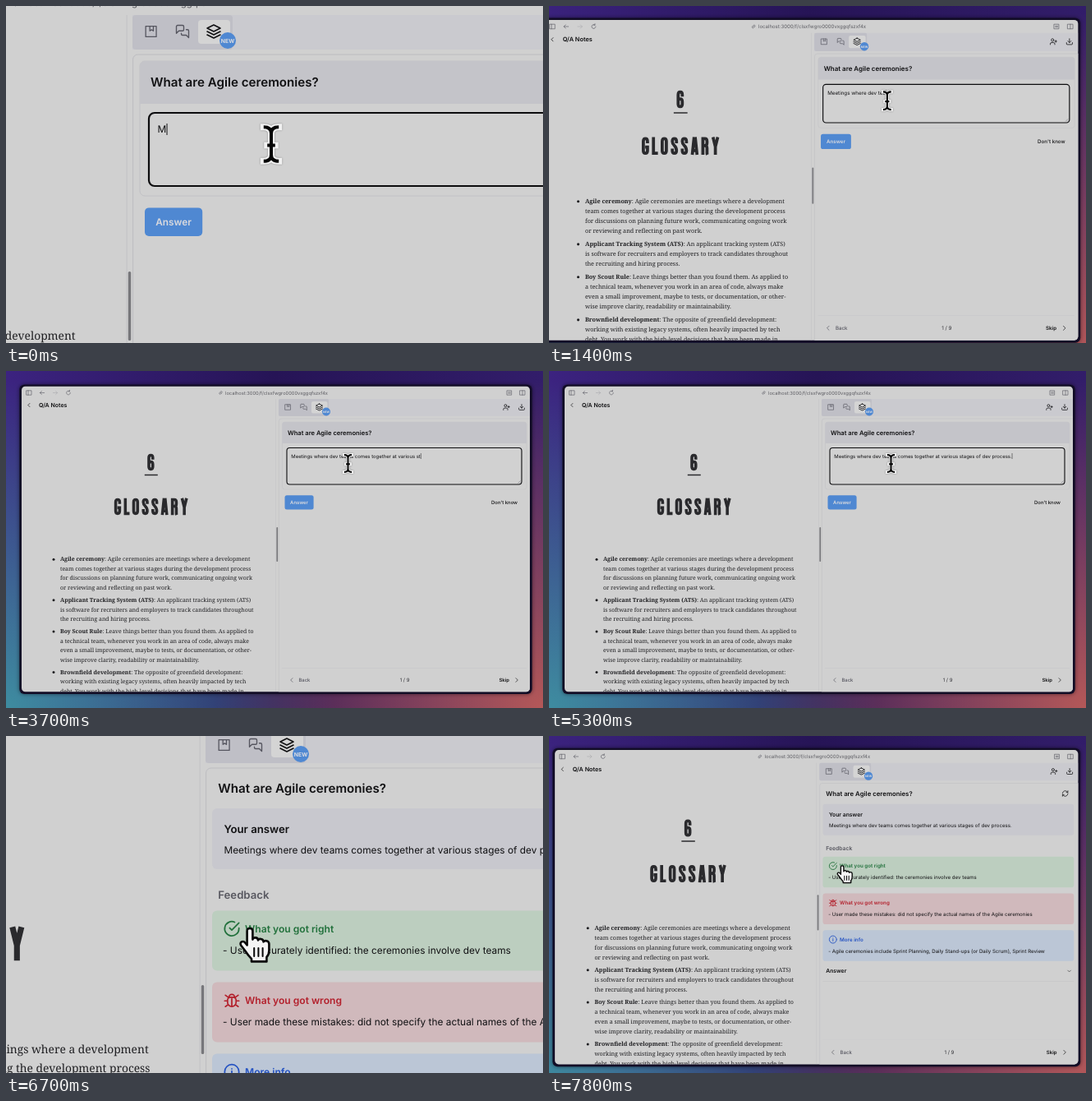
An HTML page with a canvas for the animation above (7.9 s loop, 654 by 410 pixels).

```html
<!DOCTYPE html>
<html lang="en">
<head>
<meta charset="utf-8">
<title>Flashcard review</title>
<style>
html, body { margin: 0; width: 100%; height: 100%; overflow: hidden; background: #150d3a; }
canvas { display: block; }
</style>
</head>
<body>
<canvas id="stage" width="654" height="410"></canvas>
<script>
const W = 654, H = 410, LOOP = 7900;
const screen2d = document.getElementById('stage').getContext('2d');
const layer = document.createElement('canvas');
layer.width = W;
layer.height = H;
const ctx = layer.getContext('2d');

const ZOOM_OUT = 911, ZOOM_IN = 5467, ZOOM_OUT_AGAIN = 7247;
const SUBMIT = 5900, FEEDBACK = 6500;
const INK = '#111113', GREY = '#55555f', PAGE = '#d0d0d0', BOOK_INK = '#1f1f22';
const SANS = 'Inter, sans-serif', SERIF = '"Noto Serif", serif';

const ANSWER = 'Meetings where dev teams comes together at various stages of dev process.';
// [time, characters typed]
const TYPING = [[0, 1], [100, 2], [200, 3], [390, 3], [1400, 22], [2000, 29], [3000, 44], [3190, 44],
  [3200, 45], [3900, 57], [4700, 65], [5100, 72], [5290, 72], [5300, 73]];

const GLOSSARY = [
  ['Agile ceremony', [': Agile ceremonies are meetings where a development',
    'team comes together at various stages during the development process',
    'for discussions on planning future work, communicating ongoing work',
    'or reviewing and reflecting on past work.']],
  ['Applicant Tracking System (ATS)', [': An applicant tracking system (ATS)',
    'is software for recruiters and employers to track candidates throughout',
    'the recruiting and hiring process.']],
  ['Boy Scout Rule', [': Leave things better than you found them. As applied to',
    'a technical team, whenever you work in an area of code, always make',
    'even a small improvement, maybe to tests, or documentation, or other-',
    'wise improve clarity, readability or maintainability.']],
  ['Brownfield development', [': The opposite of greenfield development:',
    'working with existing legacy systems, often heavily impacted by tech',
    'debt. You work with the high-level decisions that have been made in',
    'the past.']]
];

const CARDS = [
  ['check', '#bccebf', '#22713c', 'What you got right',
    '- User accurately identified: the ceremonies involve dev teams'],
  ['bug', '#d0b9bc', '#b3202c', 'What you got wrong',
    '- User made these mistakes: did not specify the actual names of the Agile ceremonies'],
  ['info', '#bbc6d6', '#2452c2', 'More info',
    '- Agile ceremonies include Sprint Planning, Daily Stand-ups (or Daily Scrum), Sprint Review']
];

// Icons on a 24-unit grid
const ICONS = {
  layers: 'M12 2 2 7l10 5 10-5-10-5zM2 17l10 5 10-5M2 12l10 5 10-5',
  book: 'M3 3H21V21H3ZM10 3V11L13 9L16 11V3',
  chat: 'M14 9a2 2 0 0 1-2 2H6l-4 4V4a2 2 0 0 1 2-2h8a2 2 0 0 1 2 2zM18 9h2a2 2 0 0 1 2 2v11l-4-4h-6a2 2 0 0 1-2-2v-1',
  invite: 'M16 21v-2a4 4 0 0 0-4-4H6a4 4 0 0 0-4 4v2M13 7a4 4 0 1 1-8 0 4 4 0 0 1 8 0M19 8v6M16 11h6',
  download: 'M21 15v4a2 2 0 0 1-2 2H5a2 2 0 0 1-2-2v-4M7 10l5 5 5-5M12 15V3',
  refresh: 'M3 12a9 9 0 0 1 15-6.7L21 8M21 3v5h-5M21 12a9 9 0 0 1-15 6.7L3 16M3 21v-5h5',
  check: 'M22 11v1a10 10 0 1 1-6-9.1M22 4 12 14l-3-3',
  bug: 'M8 8a4 4 0 0 1 8 0ZM6 12a4 4 0 0 1 4-4h4a4 4 0 0 1 4 4v3a6 6 0 0 1-12 0zM12 20V10M6 13H2M22 13h-4M7 8 3 5M17 8l4-3M7 18l-4 3M17 18l4 3',
  info: 'M22 12a10 10 0 1 1-20 0 10 10 0 0 1 20 0M12 16v-5M12 8v.1',
  left: 'M15 5l-7 7 7 7', right: 'M9 5l7 7-7 7', down: 'M5 9l7 7 7-7',
  back: 'M21 12H3M10 5l-7 7 7 7', forward: 'M3 12H21M14 5l7 7-7 7',
  reload: 'M20 12a8 8 0 1 1-3-6.2M17 1v5h-5',
  sidebar: 'M3 4H21V20H3ZM9 4V20', split: 'M3 4H21V20H3ZM12 4V20', reader: 'M4 4H20V20H4ZM8 10h8M8 14h8',
  link: 'M10 14L14 10M9 9L6 12a4 4 0 0 0 6 6l3-3M15 15l3-3a4 4 0 0 0-6-6l-3 3'
};

// Condensed display letters as centre lines: [advance, path]
const LETTERS = {
  G: [13.2, 'M5.4 6V3.5Q5.4 0 2.7 0T0 3.5V15.5Q0 19 2.7 19T5.4 15.5V11H2.4'],
  L: [11.4, 'M0-2V19H5.8'],
  O: [13.2, 'M0 3.5Q0 0 2.7 0T5.4 3.5V15.5Q5.4 19 2.7 19T0 15.5Z'],
  S: [13, 'M5.4 6V3.5Q5.4 0 2.7 0T0 3.5Q0 6.5 2.7 9T5.4 15.5Q5.4 19 2.7 19T0 15.5V13'],
  A: [13.8, 'M0 21 2.4-2M6.2 21 3.8-2M1 15.4H5.2'],
  R: [13.2, 'M0 21V0H2.7Q5.4 0 5.4 3.5V5.5Q5.4 9 2.7 9H0M2.7 9Q5.4 9 5.4 12.5V18Q5.4 20 5.8 21'],
  Y: [13.8, 'M0-2 3.1 10.5 6.2-2M3.1 10V21'],
  6: [13.2, 'M5.4 6V3.5Q5.4 0 2.7 0T0 3.5V15.5Q0 19 2.7 19T5.4 15.5V12.5Q5.4 9 2.7 9T0 12']
};

const IBEAM = new Path2D('M-4.6-10.4Q0-10.4 0-6.5V6.5Q0 10.4-4.6 10.4M4.6-10.4Q0-10.4 0-6.5M0 6.5Q0 10.4 4.6 10.4M-2.4.8H2.4');
const HAND = new Path2D('M-1.7 1.6Q-1.7 0 0 0T1.7 1.6V6.8Q1.9 5.6 3.4 5.7Q5 5.8 5 7.2Q5.3 6.3 6.7 6.5Q8.3 6.8 8.3 8.2Q8.8 7.4 10 7.6Q11.7 7.9 11.7 9.5V13.5Q11.7 16 10.2 17.5V20.2H1V18.6Q-1 16.5-3 13.5L-5.3 10.5Q-6.3 9-5 8.2Q-3.8 7.6-2.7 9L-1.7 10.2Z');
const HAND_FOLDS = new Path2D('M2.6 12V17M5.2 12V17M7.8 12V17');

const clamp = v => Math.max(0, Math.min(1, v));
const smooth = v => v * v * (3 - 2 * v);
// Critically damped spring, from 1 down to 0
const settle = ms => ms < 0 ? 1 : (1 + ms * .0097) * Math.exp(-ms * .0097);

function typedCount(t) {
  const next = TYPING.findIndex(key => key[0] > t);
  if (next < 0) return ANSWER.length;
  const [t0, n0] = TYPING[next - 1], [t1, n1] = TYPING[next];
  return Math.floor(n0 + (n1 - n0) * (t - t0) / (t1 - t0));
}

function camera(t) {
  const first = t < ZOOM_IN;
  const zoom = first ? settle(t - ZOOM_OUT) : (1 - settle(t - ZOOM_IN)) * settle(t - ZOOM_OUT_AGAIN);
  const [x, y] = first ? [510, 57] : [421, 77];
  return { scale: 1 + zoom, x: -x * zoom, y: -y * zoom };
}

// y is the middle of the capitals
function text(str, x, y, size = 5.94, weight = 400, color = INK, align = 'left', family = SANS) {
  ctx.font = `${weight} ${size}px ${family}`;
  ctx.fillStyle = color;
  ctx.textAlign = align;
  ctx.fillText(str, x, y + size * .36);
  return ctx.measureText(str).width;
}

function box(x0, y0, x1, y1, fill, radius = 0, stroke, width = .5) {
  ctx.beginPath();
  ctx.roundRect(x0, y0, x1 - x0, y1 - y0, radius);
  if (fill) { ctx.fillStyle = fill; ctx.fill(); }
  if (stroke) { ctx.strokeStyle = stroke; ctx.lineWidth = width; ctx.stroke(); }
}

function disc(x, y, r, fill) {
  ctx.beginPath();
  ctx.arc(x, y, r, 0, 7);
  ctx.fillStyle = fill;
  ctx.fill();
}

function icon(name, x, y, size, color = INK, weight = 2) {
  ctx.save();
  ctx.translate(x - size / 2, y - size / 2);
  ctx.scale(size / 24, size / 24);
  ctx.strokeStyle = color;
  ctx.lineWidth = weight;
  ctx.lineCap = ctx.lineJoin = 'round';
  ctx.stroke(new Path2D(ICONS[name]));
  ctx.restore();
}

function heading(word, x, y) {
  ctx.save();
  ctx.translate(x, y);
  ctx.scale(.89, .89);
  ctx.translate(2, 2);
  ctx.strokeStyle = '#2a2a2d';
  ctx.lineWidth = 4;
  for (const letter of word) {
    const [advance, path] = LETTERS[letter];
    ctx.stroke(new Path2D(path));
    ctx.translate(advance, 0);
  }
  ctx.restore();
}

function wallpaper() {
  const top = ctx.createLinearGradient(0, 0, W, 0);
  top.addColorStop(0, '#3c2380');
  top.addColorStop(.5, '#261456');
  top.addColorStop(1, '#321d6a');
  ctx.fillStyle = top;
  ctx.fillRect(0, 0, W, H);
  for (const [x, color] of [[0, '62,140,160'], [W, '180,88,88']]) {
    const glow = ctx.createRadialGradient(x, H, 0, x, H, 400);
    glow.addColorStop(0, `rgba(${color},1)`);
    glow.addColorStop(1, `rgba(${color},0)`);
    ctx.fillStyle = glow;
    ctx.fillRect(0, 0, W, H);
  }
}

function browserBar() {
  icon('sidebar', 28, 26.5, 8, GREY, 1.8);
  icon('back', 44, 26.5, 7, GREY);
  icon('forward', 60, 26.5, 7, '#aaaaae');
  icon('reload', 76, 26.5, 7, GREY);
  icon('link', 261.5, 26.5, 6, GREY);
  text('localhost:3000/f/clsxfwgro0000vxggqfszxf4x', 267, 26.5, 5.75, 400, '#5c5c62');
  icon('reader', 613, 26.5, 8, GREY, 1.8);
  icon('split', 629, 26.5, 8, GREY, 1.8);
}

function bookPage() {
  icon('left', 28, 41.5, 7, INK, 2.4);
  text('Q/A Notes', 40, 41.5, 7, 600);
  heading('6', 172.2, 100.7);
  box(168.8, 125.8, 184.8, 127.3, '#2a2a2d');
  heading('GLOSSARY', 131.8, 154.7);
  const bookText = (str, x, y, weight) => text(str, x, y, 6.9, weight, BOOK_INK, 'left', SERIF);
  let y = 229;
  for (const [term, lines] of GLOSSARY) {
    disc(58, y + .2, 1.5, BOOK_INK);
    lines.forEach((line, i) => {
      const termWidth = i ? 0 : bookText(term, 66, y, 600);
      bookText(line, 66 + termWidth, y, 400);
      y += 11.5;
    });
    y += 3.6;
  }
}

function panelFrame() {
  box(328.3, 34, 328.8, 390, '#c2c2c5');
  box(329.4, 190, 331.1, 232, '#77777b', .8);
  box(332, 34, 638, 55, '#cacacf');
  box(332, 34, 393, 55, '#bfbfc6', 2);
  box(372, 37, 391.5, 51.5, '#d4d4d4', 2);
  icon('book', 343.3, 44, 8.6, GREY, 1.8);
  icon('chat', 362.5, 44, 9, GREY, 1.8);
  icon('layers', 381.5, 44, 9.6, INK);
  disc(390, 49.5, 5, '#4f88d2');
  text('NEW', 390, 49.6, 3.4, 700, '#dcdce0', 'center');
  icon('invite', 609.5, 44, 9);
  icon('download', 628, 44, 9);
  box(332.3, 58, 642, 400, PAGE, 3, '#bcbcc0');
  box(336, 361, 634, 361.4, '#c6c6c9');
  icon('left', 348, 376, 8, GREY);
  text('Back', 356.5, 376, 5.9, 500, GREY);
  text('1 / 9', 485.5, 376, 6, 400, '#333338', 'center');
  text('Skip', 600.5, 376, 5.9, 600);
  icon('right', 622, 376, 8);
}

function questionView(t) {
  box(336.5, 62, 634, 144, PAGE, 3, '#c1c1c5');
  box(336.5, 62, 634, 88, '#c4c4c9', [3, 3, 0, 0]);
  text('What are Agile ceremonies?', 343, 75, 7.58, 600);
  box(342, 93.5, 628, 138, '#d1d1d1', 3.5, '#0c0c0e', 1.1);
  const caret = 347.3 + text(ANSWER.slice(0, typedCount(t)), 347.3, 103.5);
  box(caret + .1, 100, caret + .6, 107, INK);
  ctx.beginPath();
  ctx.moveTo(623.5, 136.5);
  ctx.lineTo(626.5, 133.5);
  ctx.moveTo(625.5, 136.5);
  ctx.lineTo(626.5, 135.5);
  ctx.strokeStyle = GREY;
  ctx.lineWidth = .4;
  ctx.stroke();
  box(339.5, 151.2, 374.6, 168.5, '#4f88d2', 2.5);
  text('Answer', 357, 160, 5.9, 600, '#dadade', 'center');
  text("Don't know", 623, 160, 5.9, 500, INK, 'right');
}

function resultView(t) {
  text('What are Agile ceremonies?', 339.6, 70.2, 7.58, 600);
  icon('refresh', 622.7, 70.2, 8.5);
  box(336, 82.5, 633, 119.5, '#c8c8ce', 3);
  text('Your answer', 343.2, 95.2, 6.6, 600);
  text(ANSWER, 343.2, 107.9);
  text('Feedback', 339.6, 134.9, 6.6, 600, '#585860');
  const ready = t >= FEEDBACK;
  if (ready) CARDS.forEach(([name, fill, color, title, body], i) => {
    const y = 144.7 + i * 43.5;
    box(336, y, 633, y + 36.5, fill, 3);
    icon(name, 348, y + 11, 10.4, color);
    text(title, 356, y + 11, 6.05, 600, color);
    text(body, 342.5, y + 24.4);
  });
  const y = ready ? 279.9 : 155.7;
  text('Answer', 339.6, y, 6.6, 600);
  icon('down', 627.5, y, 6);
  box(336, y + 12.3, 633, y + 12.7, '#c2c2c5');
}

function pointer(t) {
  const move = smooth(clamp((t - ZOOM_IN) / 400));
  ctx.save();
  ctx.translate(416.5 - 57.5 * move, 112.5 + 43 * move);
  ctx.lineCap = ctx.lineJoin = 'round';
  ctx.shadowColor = 'rgba(0,0,0,.4)';
  ctx.shadowBlur = 2;
  if (move < .75) {
    ctx.lineCap = 'square';
    ctx.strokeStyle = '#f2f2f2';
    ctx.lineWidth = 4;
    ctx.stroke(IBEAM);
    ctx.shadowColor = 'transparent';
    ctx.lineCap = 'butt';
    ctx.strokeStyle = '#050505';
    ctx.lineWidth = 2;
    ctx.stroke(IBEAM);
  } else {
    ctx.fillStyle = '#f4f4f4';
    ctx.fill(HAND);
    ctx.shadowColor = 'transparent';
    ctx.strokeStyle = '#080808';
    ctx.lineWidth = 1.3;
    ctx.stroke(HAND);
    ctx.lineWidth = 1;
    ctx.stroke(HAND_FOLDS);
  }
  ctx.restore();
}

function drawScene(t, view) {
  ctx.setTransform(view.scale, 0, 0, view.scale, view.x, view.y);
  ctx.textRendering = 'geometricPrecision';
  wallpaper();
  ctx.save();
  ctx.shadowColor = 'rgba(0,0,0,.5)';
  ctx.shadowBlur = 5 * view.scale;
  box(16.3, 16.5, 640.7, 393, '#120d26', 6);
  ctx.restore();
  ctx.save();
  box(19, 18.8, 638, 390.2, PAGE, 4.5);
  ctx.clip();
  browserBar();
  bookPage();
  panelFrame();
  (t < SUBMIT ? questionView : resultView)(t);
  ctx.restore();
  pointer(t);
}

// Averages a few camera positions while the view is moving fast
function render(t) {
  const shutter = 7;
  const speed = Math.abs(camera(t).scale - camera(Math.max(0, t - shutter)).scale);
  const samples = speed > .004 ? 5 : 1;
  for (let i = 0; i < samples; i++) {
    drawScene(t, camera(samples > 1 ? t + (i / (samples - 1) - .5) * shutter : t));
    screen2d.globalAlpha = 1 / (i + 1);
    screen2d.drawImage(layer, 0, 0);
  }
}

function tick() {
  render(performance.now() % LOOP);
  requestAnimationFrame(tick);
}
tick();
</script>
</body>
</html>
```
